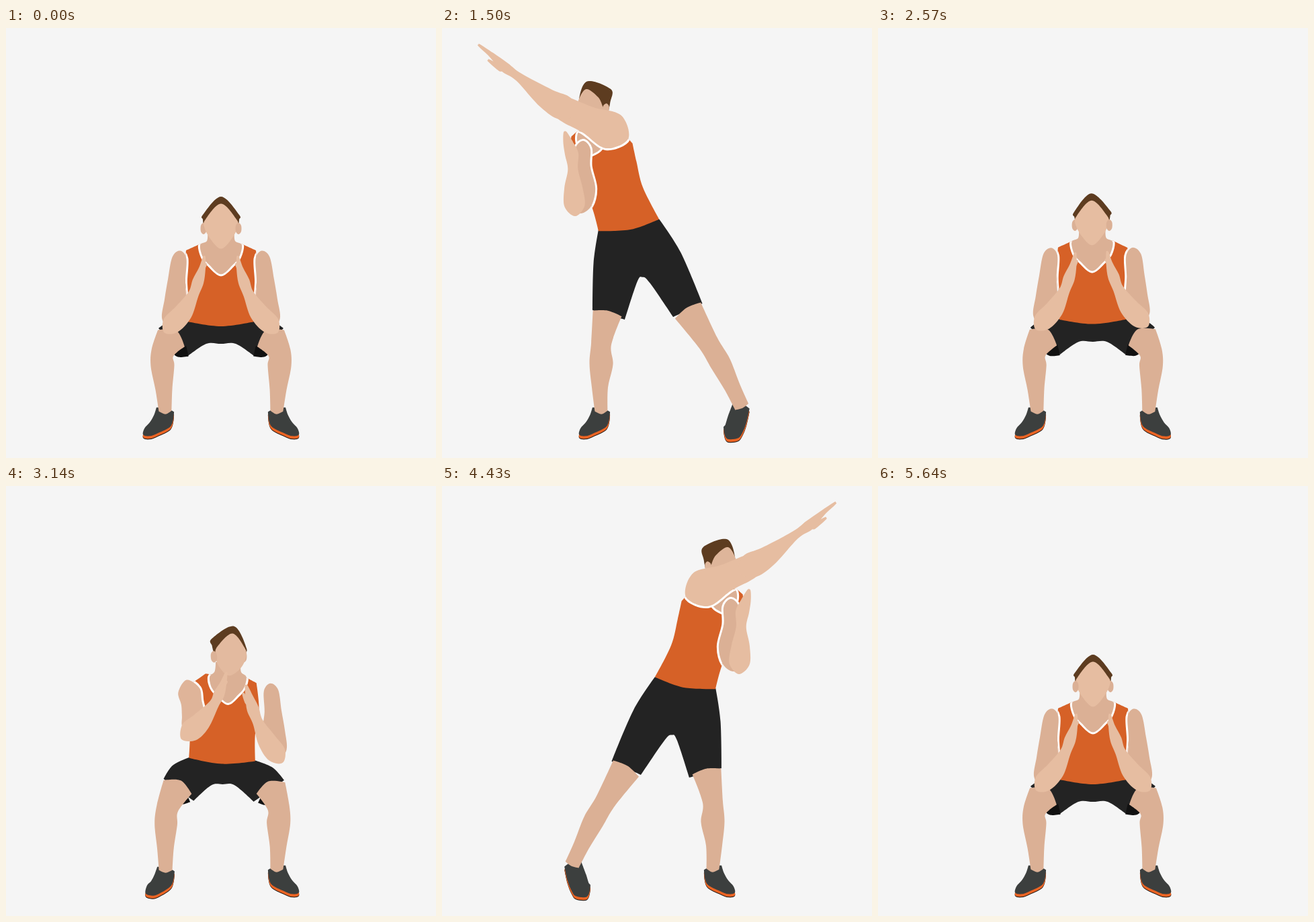
Write an HTML page that moves like this. It is 640 by 640 pixels and loops after 5780 ms.

```html
<!DOCTYPE html>
<html lang="en">
<head>
<meta charset="utf-8">
<title>Squat and reach</title>
<style>
  html, body { margin: 0; width: 100%; height: 100%; overflow: hidden; background: #f5f5f5; }
  svg { display: block; width: 100vw; height: 100vh; }
</style>
</head>
<body>
<svg viewBox="0 0 640 640">
  <clipPath id="shirt"><path/></clipPath>
  <g id="man"></g>
</svg>
<script>
const LOOP = 5780, STEP = LOOP / 81, RISE = 1250;
const DARK = [219, 176, 149], LIGHT = [230, 189, 161], FACE = [222, 181, 154];
const ORANGE = '#d66127', BLACK = '#232323', DEEP = '#111', HAIR = '#5d3c20';
const SHOE = '#3c3f3e', SOLE = '#ea6424';

const clamp = (v, lo = 0, hi = 1) => Math.min(hi, Math.max(lo, v));
const mix = (a, b, k) => a + (b - a) * k;
const flipX = p => ({ ...p, x: 640 - p.x });

// Drift: how far a point still travels late in the reach
const body = p => [13 * clamp((420 - p.y) / 200), 10 * clamp((420 - p.y) / 100)];
const slide = (from, to = from) => (p, k) => from.map((v, i) => mix(v, to[i], k));
const fixed = slide([0, 0]);
const head = slide([10, 8]);

const man = document.getElementById('man');
const clip = document.querySelector('#shirt path');
const parts = [];

function addPath(attrs) {
  const el = document.createElementNS('http://www.w3.org/2000/svg', 'path');
  for (const name in attrs) el.setAttribute(name, attrs[name]);
  man.append(el);
  return el;
}

function add(color, a, b, move, { trim, caps, sink = 0 } = {}) {
  const els = [];
  if (trim) els.push(addPath({ stroke: '#fff', 'stroke-width': 6, 'clip-path': 'url(#shirt)' }));
  const el = addPath({ fill: Array.isArray(color) ? 'none' : color });
  els.push(el);
  if (sink) el.setAttribute('transform', `translate(0 ${sink})`);
  const part = { els, el, color, a, b, move, caps };
  parts.push(part);
  return part;
}

// Outline: "x,y" is a smooth point, "x,y!" a corner
const points = text => text.split(' ').map(p => {
  const [x, y] = p.split(',').map(parseFloat);
  return { x, y, corner: p.endsWith('!') };
});
// Completes the right half of an outline, from top centre to bottom centre
const symmetric = text => {
  const pts = points(text);
  return [...pts, ...pts.slice(1, -1).reverse().map(flipX)];
};
const outline = (color, a, b) => add(color, symmetric(a), points(b), body);

// Limb: round start, stations "x,y,half-width", round end
const limb = text => {
  const words = text.split(' ');
  const stations = words.slice(1, -1).map(s => {
    const [x, y, w] = s.split(',').map(Number);
    return { x, y, w };
  });
  return { stations, caps: [+words[0], +words.at(-1)] };
};
const mirror = l => ({ ...l, stations: l.stations.map(flipX) });
const tube = (color, a, b, move, more) =>
  add(color, a.stations, b.stations, move, { ...more, caps: [a.caps, b.caps] });

const foot = limb('.2 403,568,13.5 407,584,15 420,595,10 430,601.5,7 1');
const frontFoot = limb('.3 424,568,13 423,586,14.5 423,598,14 423,603,13 .75');
const leg = limb('.6 394,462,23.5 407,483,17 407,503,17.5 405,538,12.5 403,570,9.5 .5');
const hem = limb('0 370,481,8 384,484,6 1');
const upper = limb('1 382,342,10.5 386,375,13 388,405,16 393,435,15 .9');
const fore = limb('1 395,443,14 376,423,14 361,396,8 354,377,8.5 348,358,5 345,341,2 1');
const thumb = limb('1 350,364,3 343,352,2 1');
const ear = limb('1 346,294,4 346,303,4 1');

for (const [color, sink] of [[DEEP, 5], [SOLE, 4], [SHOE, 0]]) {
  tube(color, mirror(foot), mirror(foot), fixed, { sink });
  tube(color, foot, frontFoot, slide([-8, 2], [-2.5, 0]), { sink });
}

outline(BLACK,
  '320,438 370,436! 398,438 413,447! 369,488! 342,470 320,470',
  '298,322 342,311 367,352 389,412 344,430 315,388 305,381 296,387 272,434 224,420 235,365 249,326');
tube(DEEP, hem, limb('0 366,430,5 370,438,5 1'), fixed);
tube(DEEP, mirror(hem), limb('0 246,434,5 244,442,5 1'), fixed);
tube([DARK, DARK], leg,
  limb('.2 366,420.5,22.6 391,470,15.5 404,502,15.5 416,538,12 425,569,11 .2'), slide([0, 0], [-8, 2]));
tube([DARK, DARK], mirror(leg),
  limb('.2 246,425,21.8 237,470,15 237,500,17.5 235,535,12 237,570,9.5 .5'), fixed);

const shirt = outline(ORANGE,
  '320,321 350,321! 372,331! 374,365 371,400 370,437! 320,444',
  '255,180 290,167 318,198 323,225 326,264 342,311 298,325 249,327 243,283 223,240 227,188 236,180');
shirt.els.push(clip);

tube([DARK, DARK],
  limb('0 320,305,20 320,317,21 320,323,31 320,341,27 320,353,17 .8'),
  limb('0 255,155,16 255,172,17 253,184,20 252,196,18 250,204,11 .8'), slide([11, 8], [13, 8]), { trim: true });
tube([DARK, DARK], mirror(upper),
  limb('1 215,203,11 214,230,12 215,262,18.5 212,288,15 .8'), slide([2, 9]), { trim: true });

tube(HAIR,
  limb('1 320,278,27 320,285,27 320,291,26.5 0'),
  limb('1 254,125,27 262,140,17 270,154,3 1'), head);
tube([DARK, DARK], mirror(ear), limb('1 240,138,4 241,147,4 1'), head);
tube([LIGHT, FACE],
  limb('1 320,284,22.5 320,296,25 320,315,15 .9'),
  limb('1 244,127,15 247,142,19 251,156,19 .5'), head);
tube([DARK, FACE], ear, limb('1 271,138,4.5 269,147,4.5 1'), head);

tube([DARK, LIGHT], upper,
  limb('.9 295,189,27 266,176,20.5 245,167,19 228,158,16 .5'), slide([15, 13], [24, 18]), { trim: true });
const leftHand = slide([4, 9], [13, 10]), rightHand = slide([23, 17], [34, 23]);
tube([LIGHT, LIGHT], mirror(fore),
  limb('1 208,289,15 211,262,13.5 215,235,7.5 218,213,10 217,196,7 218,183,3 1'), leftHand);
tube([LIGHT, LIGHT], mirror(thumb), limb('1 225,210,3 227,196,2 1'), slide([13, 10]));
tube([LIGHT, LIGHT], fore,
  limb('1 244,165,18 222,153,15.5 187,124.5,6.5 172,113,7.5 158,98,4 146,87,2 1'), rightHand);
tube([LIGHT, LIGHT], thumb, limb('1 172,119,4 155,107,2 1'), slide([32, 22]));

// Outline points around a chain of stations
function wrap(line, caps) {
  const last = line.length - 1, sides = [[], []], tips = [];
  line.forEach((s, i) => {
    const p = line[Math.max(0, i - 1)], q = line[Math.min(last, i + 1)];
    const len = Math.hypot(q.x - p.x, q.y - p.y);
    const ux = (q.x - p.x) / len, uy = (q.y - p.y) / len;
    const corner = (i === 0 && caps[0] < .7) || (i === last && caps[1] < .7);
    sides.forEach((side, j) => {
      const w = j ? s.w : -s.w;
      side.push({ x: s.x - uy * w, y: s.y + ux * w, corner });
    });
    if (i === 0) tips[0] = { x: s.x - ux * s.w * caps[0], y: s.y - uy * s.w * caps[0] };
    if (i === last) tips[1] = { x: s.x + ux * s.w * caps[1], y: s.y + uy * s.w * caps[1] };
  });
  return [tips[0], ...sides[0], tips[1], ...sides[1].reverse()];
}

// Smooth closed curve, sharp at corners
function trace(pts) {
  const n = pts.length, at = i => pts[(i + n) % n];
  const xy = (x, y) => x.toFixed(2) + ' ' + y.toFixed(2);
  const handle = (i, dir) => {
    const p = at(i), k = p.corner ? 0 : dir / 6;
    return xy(p.x + (at(i + 1).x - at(i - 1).x) * k, p.y + (at(i + 1).y - at(i - 1).y) * k);
  };
  const curves = pts.map((p, i) => `C${handle(i, 1)} ${handle((i + 1) % n, -1)} ${xy(at(i + 1).x, at(i + 1).y)}`);
  return `M${xy(pts[0].x, pts[0].y)}${curves.join('')}Z`;
}

function draw(time) {
  const t = Math.floor((time % LOOP + 4) / STEP) * STEP % LOOP;
  const flip = t > LOOP / 2 - 110;
  const age = clamp(flip ? Math.min(t - 2877, 5612 - t) : Math.min(t, 2678 - t), 0, RISE);

  // turn: squat to stance; e: reach still to come, negative past the stance
  const u = clamp(age / 640);
  const turn = u * u * u * (10 - 15 * u + 6 * u * u);
  const v = (age - 710) / (RISE - 710);
  const e = Math.min(3, 2.7 * (1 - v) ** 2 - 2.7);

  man.setAttribute('transform', flip ? 'translate(640 0) scale(-1 1)' : '');
  for (const { els, el, color, a, b, move, caps } of parts) {
    const pts = a.map((p, i) => {
      const q = b[i], [dx, dy] = move(q, i / (a.length - 1));
      return {
        x: mix(p.x, q.x + dx * e, turn),
        y: mix(p.y, q.y + dy * e, turn),
        w: mix(p.w, q.w, turn),
        corner: p.corner
      };
    });
    const d = trace(caps ? wrap(pts, caps[0].map((c, i) => mix(c, caps[1][i], turn))) : pts);
    els.forEach(x => x.setAttribute('d', d));
    if (Array.isArray(color)) {
      el.setAttribute('fill', `rgb(${color[0].map((c, i) => Math.round(mix(c, color[1][i], turn)))})`);
    }
  }
}

const start = performance.now();
function tick() {
  draw(performance.now() - start);
  requestAnimationFrame(tick);
}
tick();
</script>
</body>
</html>
```
